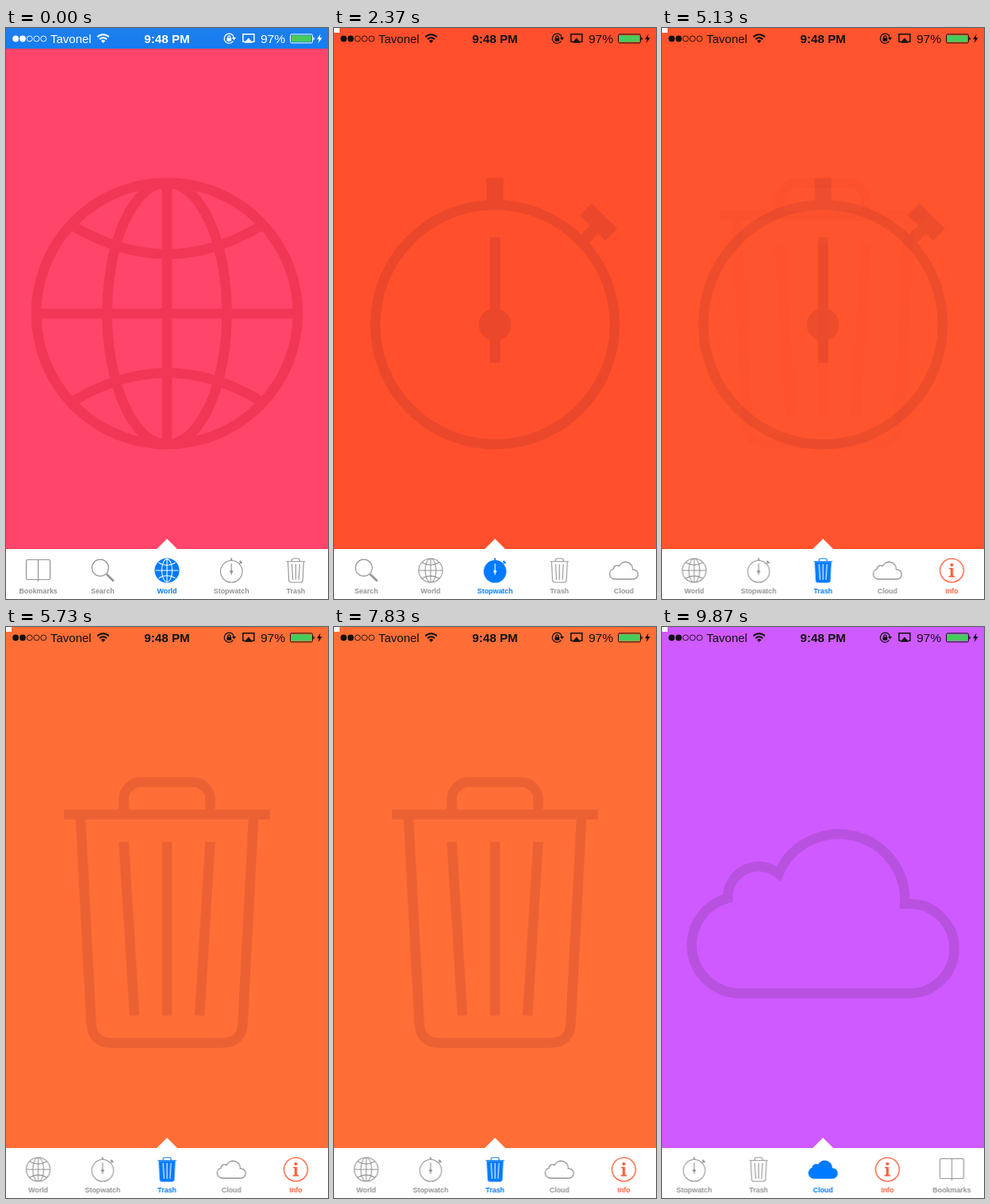
Animation, 406 px wide and 720 px high, one loop 9.9 s. Source, as an HTML page:

```html
<!DOCTYPE html>
<html lang="en">
<head>
<meta charset="utf-8">
<title>Tab bar</title>
<style>
  html, body { margin: 0; width: 100%; height: 100%; overflow: hidden; background: #fff; }
  svg { display: block; width: 406px; height: 720px; }
  text { font-family: "Liberation Sans", Arial, sans-serif; fill: currentColor; }
  .line { fill: none; stroke: currentColor; stroke-width: 12.5; }
  .solid { fill: currentColor; stroke: none; }
  .thin { fill: none; stroke: currentColor; stroke-width: 1.2; }
  .label { font-size: 8.9px; font-weight: bold; text-anchor: middle; }

  .tabs { color: #939393; }
  .on { color: #007aff; }
  .info { color: #fa5b35; }
  .white { color: #fff; }

  .screen, .strip, .on, .status, .bar, .corner {
    animation: 9.9s linear infinite;
  }
  .watch { animation-name: showWatch; }
  .trash { animation-name: showTrash; }
  .cloud { animation-name: showCloud; }
  .strip { animation-name: scroll; }
  .on, .status, .bar, .corner { animation-timing-function: step-end; }
  .on.t1 { animation-name: pick1; }
  .on.t2 { animation-name: pick2; }
  .on.t3 { animation-name: pick3; }
  .on.t4 { animation-name: pick4; }
  .status { animation-name: ink; }
  .bar { animation-name: hide; }
  .corner { animation-name: reveal; }

  @keyframes showWatch {
    0%, 5.66% { opacity: 0; animation-timing-function: ease-in-out; }
    10.1%, 100% { opacity: 1; }
  }
  @keyframes showTrash {
    0%, 50.35% { opacity: 0; animation-timing-function: ease-in-out; }
    55.4%, 100% { opacity: 1; }
  }
  @keyframes showCloud {
    0%, 84.9% { opacity: 0; animation-timing-function: ease-in-out; }
    89.95%, 100% { opacity: 1; }
  }
  @keyframes scroll {
    0%, 2.02% { transform: translateX(0); animation-timing-function: ease-in-out; }
    5.66%, 46.06% { transform: translateX(-81.2px); animation-timing-function: ease-in-out; }
    49.7%, 80.6% { transform: translateX(-162.4px); animation-timing-function: ease-in-out; }
    84.24%, 100% { transform: translateX(-243.6px); }
  }
  @keyframes pick1 { 0% { opacity: 1; } 3.84%, 100% { opacity: 0; } }
  @keyframes pick2 { 0% { opacity: 0; } 3.84% { opacity: 1; } 47.9%, 100% { opacity: 0; } }
  @keyframes pick3 { 0% { opacity: 0; } 47.9% { opacity: 1; } 82.4%, 100% { opacity: 0; } }
  @keyframes pick4 { 0% { opacity: 0; } 82.4%, 100% { opacity: 1; } }
  @keyframes ink { 0% { color: #fff; } 17.17%, 100% { color: #111; } }
  @keyframes hide { 0% { opacity: 1; } 17.17%, 100% { opacity: 0; } }
  @keyframes reveal { 0% { opacity: 0; } 17.17%, 100% { opacity: 1; } }
</style>
</head>
<body>
<svg viewBox="0 0 406 720" xmlns="http://www.w3.org/2000/svg">
  <defs>
    <linearGradient id="blue" x2="0" y2="1">
      <stop offset="0" stop-color="#1f7fec"/>
      <stop offset="1" stop-color="#157cf2"/>
    </linearGradient>

    <!-- Icons centred on 0,0, 342 units across -->
    <path id="grid" class="line" d="M0-165V165M-165 0H165M-121-112Q0-38 121-112M-121 112Q0 38 121 112M0-165A75.5 165 0 0 1 0 165A75.5 165 0 0 1 0-165"/>
    <g id="world">
      <path class="line" d="M0-165V165M-165 0H165M-121-112Q0-38 121-112M-121 112Q0 38 121 112M0-165A75.5 165 0 0 1 0 165A75.5 165 0 0 1 0-165M0-165A165 165 0 0 1 0 165A165 165 0 0 1 0-165"/>
    </g>
    <g id="crown" class="solid">
      <rect x="-10.5" y="-171" width="21" height="34"/>
      <path d="M107-124L122-139L154-107L139-92L130-101L113-84L103-94L120-111Z"/>
    </g>
    <g id="hand" class="solid">
      <rect x="-6.5" y="-96" width="13" height="158"/>
      <circle cy="14" r="20.5"/>
    </g>
    <g id="watch">
      <circle class="line" cy="14" r="151"/>
      <use href="#crown"/>
      <use href="#hand"/>
    </g>
    <path id="lid" class="line" d="M-130-123.5H130M-54.5-129V-142A22 22 0 0 1-32.5-164.5H32.5A22 22 0 0 1 54.5-142V-129"/>
    <path id="ribs" class="line" d="M-54.5-89L-41 130M0-89V130M54.5-89L41 130"/>
    <path id="bin" d="M-109-118L-95.5 140Q-94 164-70 164.5H70Q94 164 95.5 140L109-118"/>
    <g id="trash">
      <use href="#lid"/>
      <use href="#ribs"/>
      <use href="#bin" class="line"/>
    </g>
    <path id="cloud" d="M-104 102A61 61 0 0 1-120-18A39 39 0 0 1-56-49A83 83 0 0 1 103-11H109A56.5 56.5 0 0 1 109 102Z"/>

    <g id="book">
      <rect class="thin" x="-15" y="-13.5" width="30" height="25" rx="1.5"/>
      <path class="thin" d="M0-13.5V14"/>
      <text class="label" y="29">Bookmarks</text>
    </g>
  </defs>

  <g class="screen" color="#f23656">
    <path fill="#ff4569" d="M0 0H406V720H0Z"/>
    <use href="#world" x="203" y="360"/>
  </g>
  <g class="screen watch" color="#eb472b">
    <path fill="#ff4f2c" d="M0 0H406V720H0Z"/>
    <use href="#watch" x="203" y="360"/>
  </g>
  <g class="screen trash" color="#ec6133">
    <path fill="#ff6e37" d="M0 0H406V720H0Z"/>
    <use href="#trash" x="203" y="360"/>
  </g>
  <g class="screen cloud" color="#b951e0">
    <path fill="#cf5aff" d="M0 0H406V720H0Z"/>
    <use href="#cloud" class="line" x="203" y="360"/>
  </g>

  <path fill="#fff" d="M0 657H190L203 644L216 657H406V720H0Z"/>

  <g class="tabs">
    <g class="strip">
      <use href="#book" x="40.6" y="684"/>
      <g transform="translate(121.8 684)">
        <circle class="thin" cx="-3" cy="-3.3" r="10.5"/>
        <path class="thin" style="stroke-width:2.6" d="M5 4.7L14 13.5"/>
        <text class="label" y="29">Search</text>
      </g>

      <g transform="translate(203 684)">
        <use href="#world" transform="scale(.091)"/>
        <text class="label" y="29">World</text>
        <g class="on t1">
          <path fill="#fff" d="M-32-20H32V36H-32Z"/>
          <circle class="solid" r="15.6"/>
          <use href="#grid" class="white" transform="scale(.087)"/>
          <text class="label" y="29">World</text>
        </g>
      </g>

      <g transform="translate(284.2 684)">
        <use href="#watch" transform="scale(.091)"/>
        <text class="label" y="29">Stopwatch</text>
        <g class="on t2">
          <path fill="#fff" d="M-32-20H32V36H-32Z"/>
          <g transform="scale(.091)">
            <circle class="solid" cy="14" r="157"/>
            <use href="#crown"/>
            <use href="#hand" class="white"/>
          </g>
          <text class="label" y="29">Stopwatch</text>
        </g>
      </g>

      <g transform="translate(365.4 684)">
        <use href="#trash" transform="scale(.091)"/>
        <text class="label" y="29">Trash</text>
        <g class="on t3">
          <path fill="#fff" d="M-32-20H32V36H-32Z"/>
          <g transform="scale(.091)">
            <use href="#lid"/>
            <use href="#bin" fill="currentColor" stroke="currentColor" stroke-width="12.5"/>
            <use href="#ribs" class="white"/>
          </g>
          <text class="label" y="29">Trash</text>
        </g>
      </g>

      <g transform="translate(446.6 684)">
        <use href="#cloud" class="line" transform="scale(.108)"/>
        <text class="label" y="29">Cloud</text>
        <g class="on t4">
          <path fill="#fff" d="M-32-20H32V36H-32Z"/>
          <use href="#cloud" fill="currentColor" stroke="currentColor" stroke-width="12.5" transform="scale(.108)"/>
          <text class="label" y="29">Cloud</text>
        </g>
      </g>

      <g class="info" transform="translate(527.8 684)">
        <circle class="thin" r="14.9" style="stroke-width:1.4"/>
        <circle class="solid" cy="-7" r="2.1"/>
        <path class="solid" d="M-3.6-3.2H1.6V6.6L3.8 7.2V8.4H-3.8V7.2L-1.6 6.6V-1.6L-3.6-2Z"/>
        <text class="label" y="29">Info</text>
      </g>
      <use href="#book" x="609" y="684"/>
    </g>
  </g>

  <rect class="bar" width="406" height="26" fill="url(#blue)"/>
  <rect class="corner" width="7" height="6" fill="#fff"/>

  <g class="status">
    <g class="solid">
      <circle cx="12.2" cy="13.5" r="3.9"/>
      <circle cx="21" cy="13.5" r="3.9"/>
    </g>
    <g class="thin" style="stroke-width:.9">
      <circle cx="29.8" cy="13.5" r="3.5"/>
      <circle cx="38.5" cy="13.5" r="3.5"/>
      <circle cx="47.3" cy="13.5" r="3.5"/>
    </g>
    <text x="56" y="18.7" font-size="15">Tavonel</text>
    <path class="thin" style="stroke-width:2" d="M115.2 11.4A9.8 9.8 0 0 1 129.8 11.4M118 14.2A6.2 6.2 0 0 1 127 14.2"/>
    <path class="solid" d="M122.5 19L119.8 16.2A3.9 3.9 0 0 1 125.2 16.2Z"/>
    <text x="203" y="18.7" font-size="15.2" font-weight="bold" text-anchor="middle">9:48 PM</text>

    <path class="thin" d="M286.4 16.6A6.1 6.1 0 1 1 287.4 12.4"/>
    <path class="solid" d="M284.8 12H290L287.4 15.4ZM278.4 12.6H284.2V16.8H278.4Z"/>
    <path class="thin" d="M279.7 12.8V11.4A1.6 1.6 0 0 1 282.9 11.4V12.8"/>
    <path class="thin" style="stroke-width:1.5" d="M301.5 17.2H298.8V7.8H312.8V17.2H310.2"/>
    <path class="solid" d="M305.8 12.6L311.2 18.8H300.4Z"/>
    <text x="321" y="18.7" font-size="15.5">97%</text>

    <rect class="thin" style="stroke-width:1" x="358.5" y="7.9" width="28" height="11" rx="1.6"/>
    <rect x="359.8" y="9.2" width="25" height="8.4" rx=".6" fill="#46cc5c"/>
    <path class="solid" d="M387.4 11.4Q389 11.8 389 13.4Q389 15 387.4 15.4Z"/>
    <path class="solid" d="M396.6 7.6L392 14.2H394.8L393.6 19.2L398.6 12.3H395.6Z"/>
  </g>
</svg>
</body>
</html>
```
